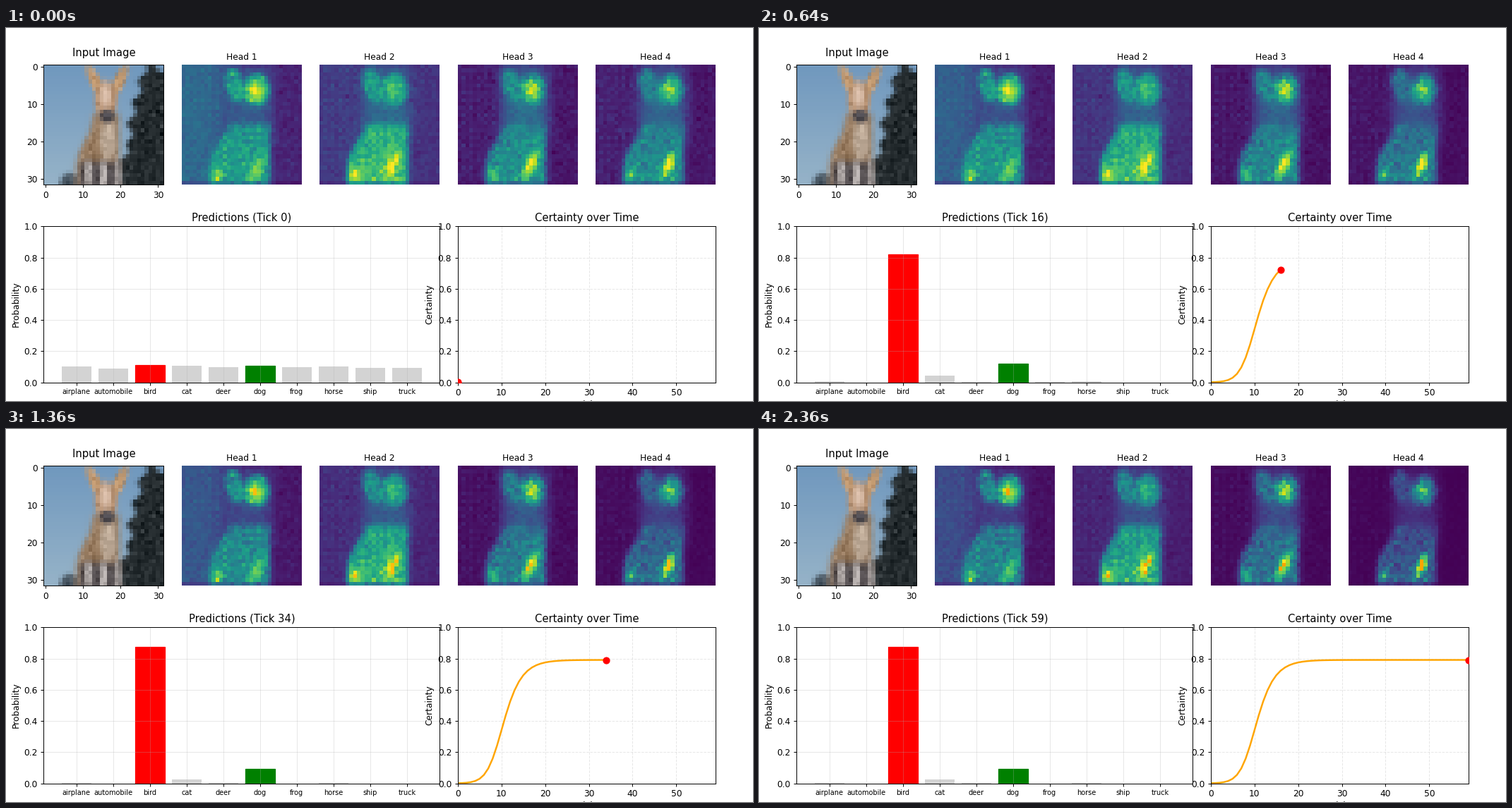
A matplotlib script that plays this animation: 1058 px wide and 529 px high, repeating every 2.4 s.

```python
import numpy as np
import matplotlib as mpl
import matplotlib.pyplot as plt
from matplotlib.animation import FuncAnimation

TICKS = 60
N = 32
ORANGE = (255, 165, 0)
rng = np.random.default_rng(7)
row, col = np.mgrid[0:N, 0:N] + 0.5


def sig(x):
    return 1 / (1 + np.exp(-x))


def oval(x, y, rx, ry, lean=0):
    """Soft-edged ellipse on the pixel grid, sheared sideways by lean."""
    d = np.hypot((col - x - lean * (row - y)) / rx, (row - y) / ry)
    return sig((1 - d) * 4 * min(rx, ry))


def blob(x, y, rx, ry, lean=0):
    return np.exp(-((col - x - lean * (row - y)) / rx) ** 2 - ((row - y) / ry) ** 2)


def torso(shoulder, hip, right, top):
    """Sitting body: the left side slopes from shoulder to hip."""
    left = shoulder + (hip - shoulder) * sig((row - 20.5) / 2.2)
    return sig(2.5 * (col - left)) * sig(2.5 * (right - col)) * sig(2 * (row - top))


def mix(a, b, k):
    return np.array(a) + (np.array(b) - np.array(a)) * np.clip(k, 0, 1)


def picture():
    img = mix((112, 152, 190), (150, 179, 200), row[..., None] / N)

    def paint(color, m, grain=10):
        nonlocal img
        img = mix(img, color + grain * rng.normal(size=(N, N, 1)), m[..., None])

    tan, fawn, dark = (155, 126, 98), (192, 150, 108), (72, 70, 76)
    edge = 27.3 - 4.3 * np.clip(row / 16, 0, 1) + 0.8 * np.sin(row * 1.1)
    edge -= 3 * sig(2 * (row - 24))
    paint((36, 43, 46), sig(3 * (col - edge)) * (1 - oval(32, 0, 2, 2)))
    paint((70, 84, 96), oval(7, 32, 2.6, 3))
    paint(tan, torso(13.3, 8.6, 20.2, 13))
    paint((186, 167, 148), oval(17.3, 20, 2.2, 5.5))
    legs = torso(13.3, 9.5, 20.5, 26)
    paint((84, 78, 80), legs)
    paint((172, 165, 163), legs * sig(5 * np.cos(1.6 * (col - 16))), 14)
    paint(fawn, oval(14, 4.8, 1.6, 4.6, 0.42))
    paint(fawn, oval(20, 4.8, 1.6, 4.6, -0.42))
    paint((182, 144, 112), oval(16.7, 9.5, 3, 5))
    paint((218, 190, 170), oval(16.6, 8.2, 1.4, 3.4), 8)
    paint(dark, oval(17, 13.7, 1.9, 1.7))
    return np.clip(img, 0, 255) / 255


FACE = np.maximum(oval(14.3, 5.6, 2.6, 4.4, 0.2), oval(19.8, 6.7, 3.7, 4.4))
FACE *= 1 - 0.75 * blob(17.4, 1.8, 1.5, 2.2)
BODY = torso(13, 7.3, 23.6, 15.8) * (0.82 + 0.22 * (row - 16) / 16)
NECK = np.exp(-(np.abs(col - 17.8) / 6.5) ** 4 - ((row - 10) / 10) ** 4)
DOTS = (row.astype(int) % 2) * (col.astype(int) % 2) * (col < 11)


def head(left, right, neck, face, body, nose, paw, foot, foot_y):
    v = mix(left, right, sig((col - 11) / 1.2)) + 0.03 * DOTS + neck * NECK
    v += rng.normal(0, 0.018, (N, N))
    grain = rng.normal(0, 0.055, (N, N))
    v = mix(v, face + grain, FACE)
    v = mix(v, body + grain, BODY)
    v += nose * blob(19.8, 6.8, 2.2, 2.6)
    v += paw * blob(9.3, 29.5, 1.3, 1.8)
    v += foot * blob(19.5, foot_y, 1.5, 3.4, -0.35)
    v *= 1 - 0.3 * (row > 31)
    return np.clip(v / np.sort(v.ravel())[-2], 0.01, 1)


# left, right, neck, face, body, nose, paw, foot, foot row
HEADS = [head(.29, .09, .16, .48, .50, .40, .22, .25, 28.5),
         head(.15, .13, .18, .48, .62, .18, .28, .30, 27),
         head(.07, .06, .26, .44, .46, .42, .22, .48, 26.5),
         head(.08, .06, .24, .42, .44, .40, .22, .52, 26.5)]
SHARPEN = [0.36, 0.3, 0.42, 0.75]

# Each class falls behind the winner by its lag times a shared confidence.
LAG = {"airplane": 1.13, "automobile": 2.39, "bird": 0, "cat": .66, "deer": 1.26,
       "dog": .42, "frog": 1.56, "horse": 1.0, "ship": 1.87, "truck": 2.1}
NAMES = list(LAG)
ticks = np.arange(TICKS)
confidence = 5.32 * sig((ticks - 11.15) / 2.75)
probs = np.exp(-np.outer(confidence, list(LAG.values())))
probs /= probs.sum(axis=1, keepdims=True)
certainty = 1 + (probs * np.log(probs)).sum(axis=1) / np.log(len(LAG))

fig = plt.figure(figsize=(12, 6), dpi=1058 / 12)
gs = fig.add_gridspec(2, 5, left=.0505, right=.95, top=.9012, bottom=.05,
                      wspace=.15, hspace=.3, height_ratios=[1, 1.3])

ax = fig.add_subplot(gs[0, 0])
ax.imshow(picture(), interpolation="nearest")
ax.set_title("Input Image", pad=10)

maps = []
for i, base in enumerate(HEADS):
    ax = fig.add_subplot(gs[0, i + 1])
    maps.append(ax.imshow(base, cmap=mpl.colormaps["viridis"].copy(),
                          vmin=0, vmax=.97, interpolation="nearest"))
    ax.set_title(f"Head {i + 1}", fontsize=10)
    ax.axis("off")

ax_pred = fig.add_subplot(gs[1, :3])
bars = ax_pred.bar(range(len(NAMES)), probs[0], color="lightgray")
bars[NAMES.index("bird")].set_color("red")
bars[NAMES.index("dog")].set_color("green")
ax_pred.set_ylim(0, 1)
ax_pred.set_xticks(range(len(NAMES)), NAMES, fontsize=8)
ax_pred.set_ylabel("Probability")
ax_pred.grid(alpha=.3)
title = ax_pred.set_title("Predictions (Tick 0)")

ax_cert = fig.add_subplot(gs[1, 3:])
ax_cert.set(xlim=(0, TICKS - 1), ylim=(0, 1), ylabel="Certainty",
            title="Certainty over Time")
ax_cert.set_xlabel("Tick", labelpad=3)
ax_cert.grid(alpha=.3, linestyle="--")
line, = ax_cert.plot([], [], lw=2)
dot, = ax_cert.plot([], [], "o", color="red", ms=7.3, zorder=5)


def update(t):
    for bar, p in zip(bars, probs[t]):
        bar.set_height(p)
    title.set_text(f"Predictions (Tick {t})")
    line.set_data(ticks[:t + 1], certainty[:t + 1])
    line.set_color(mix((220, 220, 30), ORANGE, (t - 7) / 6) / 255)
    dot.set_data([t], [certainty[t]])
    peak = mix((253, 231, 37), ORANGE, (t - 20) / 22) / 255
    for im, base, k in zip(maps, HEADS, SHARPEN):
        im.cmap.set_over(peak)
        im.set_data(base ** (1 + k * t / (TICKS - 1)))
    return [*maps, *bars, title, line, dot]


anim = FuncAnimation(fig, update, frames=TICKS, interval=40, repeat=True,
                     repeat_delay=0, blit=False)
plt.show()
```
